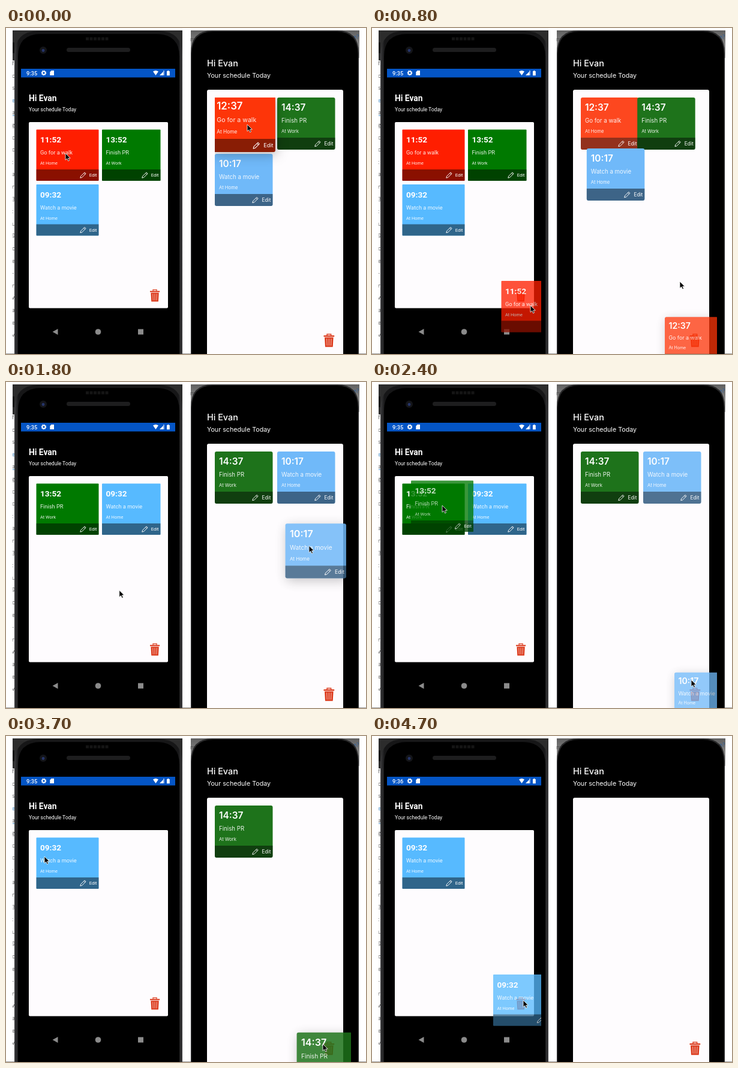
Recreate the animation shown at these times as an HTML page. Size 600 px wide and 544 px high, loop 4800 ms.

```html
<!DOCTYPE html>
<html lang="en">
<head>
<meta charset="utf-8">
<title>Schedule cards on two phones</title>
<style>
  html, body { margin: 0; width: 100%; height: 100%; overflow: hidden; background: #fff; }
  svg { display: block; width: 600px; height: 544px; }
  text { fill: #fff; }
  .droid { font-family: Roboto, Arial, sans-serif; }
  .ios { font-family: Inter, Arial, sans-serif; }
  .edge text { font: 9px "Open Sans", sans-serif; fill: #444; }
  .lift { filter: drop-shadow(2px 4px 9px rgba(0, 0, 0, .27)); }
</style>
</head>
<body>
<svg viewBox="0 0 600 544">
  <defs>
    <clipPath id="droidScreen"><rect x="25" y="67" width="257" height="477"/></clipPath>
    <clipPath id="iosCards"><rect x="348" y="116" width="227" height="428"/></clipPath>
    <clipPath id="edgeClip"><rect x="11" y="20" width="5" height="524"/></clipPath>
    <linearGradient id="rim">
      <stop offset="0" stop-color="#3c3c3e"/><stop offset=".025" stop-color="#161617"/>
      <stop offset=".975" stop-color="#161617"/><stop offset="1" stop-color="#3c3c3e"/>
    </linearGradient>
    <linearGradient id="corner" x2="0" y2="1">
      <stop offset="0" stop-color="#606060"/><stop offset="1" stop-color="#a8a8a8"/>
    </linearGradient>
    <g id="pencil" fill="none" stroke="#fff" stroke-width=".95" stroke-linejoin="round">
      <path d="M.8 10.2 1.6 7.3 8 .9 10.1 3 3.7 9.4ZM6.6 2.3 8.7 4.4"/>
    </g>
    <g id="bin">
      <path d="M5.3 3V.9H11.7V3" fill="none" stroke="#dc3a1c" stroke-width="1.4"/>
      <path d="M0 2.8H17V5H0ZM1.5 6H15.5L14.6 21.5H2.4Z" fill="#dc3a1c"/>
      <path d="M5 8 5.4 19.4M8.5 8V19.4M12 8 11.6 19.4" stroke="#f8d5cd" stroke-width=".9"/>
    </g>
    <path id="arrow" d="M0 0V11.3L2.7 8.9 4.6 13 6.5 12.1 4.7 8.2H8.3Z" fill="#000" stroke="#fff" stroke-width=".8"/>
  </defs>

  <path d="M0 543.5H600" stroke="#9a9a9a"/>

  <!-- left phone -->
  <g class="edge" id="edge" clip-path="url(#edgeClip)"></g>
  <rect x="11" y="4" width="283" height="50" fill="#2c2c2c"/>
  <rect x="11" y="24" width="3" height="18" fill="#111"/>
  <path d="M14 544V46Q14 5 54 5H254Q294 5 294 46V544Z" fill="url(#rim)"/>
  <path d="M20 544V48Q20 10 58 10H250Q289 10 289 48V544Z" fill="#000"/>
  <path d="M133 18H172" stroke="#151515" stroke-width="5" stroke-dasharray="5 1.5"/>
  <rect x="101" y="33" width="106" height="7" rx="3.5" fill="#1d1d1e"/>
  <circle cx="62" cy="37" r="6" fill="#141519"/>
  <circle cx="62" cy="37.5" r="2.4" fill="#26356a"/>
  <rect x="25" y="68" width="257" height="14.5" fill="#0455c5"/>
  <g class="droid">
    <text id="clock" x="34" y="78.5" font-size="9.2" font-weight="500">9:35</text>
    <text x="38" y="122.4" font-size="13.8" font-weight="700">Hi Evan</text>
    <text x="38" y="138.7" font-size="8.6">Your schedule Today</text>
  </g>
  <circle cx="63" cy="75" r="2.6" fill="none" stroke="#fff" stroke-width="1.8"/>
  <circle cx="63" cy="75" r="3.7" fill="none" stroke="#fff" stroke-width="1.2" stroke-dasharray="1.45 1.45"/>
  <path d="M75.5 71H80V79H73.3V73.4Z" fill="#fff"/>
  <path d="M245 72.6Q249.5 69.5 254 72.6L249.5 79ZM264 71V79H256Z" fill="#fff"/>
  <path d="M262 71V79H264V71Z" fill="#8fb4e8"/>
  <path d="M268 72H269.4V71H271.4V72H272.8V79.3H268Z" fill="#fff"/>
  <rect x="38" y="157" width="232" height="310.5" rx="2" fill="#fefcfe"/>
  <use href="#bin" transform="translate(240 436) scale(.95)"/>
  <g fill="#8b8b8b">
    <path d="M77.5 507 86.5 502V512Z"/><circle cx="153.5" cy="507" r="4.8"/>
    <rect x="220" y="502.5" width="9" height="9"/>
  </g>

  <!-- right phone -->
  <rect x="308" y="4" width="281" height="46" fill="url(#corner)"/>
  <g font-family="Open Sans, sans-serif" font-size="9">
    <text x="307" y="22" style="fill:#444">m</text><text x="579" y="18" style="fill:#245a9a">e?</text>
  </g>
  <path d="M308 544V42Q308 4 344 4H552Q588 4 588 42V544Z" fill="#29292a"/>
  <path d="M309.5 544V44Q309.5 6 345 6H551Q586.5 6 586.5 44V544Z" fill="#000"/>
  <g class="ios">
    <text x="335" y="64" font-size="14.4" font-weight="500">Hi Evan</text>
    <text x="335" y="82.5" font-size="10.7">Your schedule Today</text>
  </g>
  <path d="M335 544V106Q335 103 338 103H559Q562 103 562 106V544Z" fill="#fefcfe"/>
  <use href="#bin" transform="translate(529.5 510) scale(1.04)"/>

  <g id="live"></g>
</svg>
<script>
const LOOP = 4800, STEP = 100;
const $ = id => document.getElementById(id);
const lerp = (a, b, u) => a + (b - a) * u;
const clamp = u => Math.max(0, Math.min(1, u));
const ease = u => u < .5 ? 2 * u * u : 1 - 2 * (1 - u) ** 2;

const tasks = {
  red: { label: 'Go for a walk', place: 'At Home' },
  green: { label: 'Finish PR', place: 'At Work' },
  blue: { label: 'Watch a movie', place: 'At Home' }
};
// text rows: [font size, baseline]
const droid = {
  cls: 'droid', h: 85.5, foot: 66.5, pad: 6.5, rx: 1, weight: 700,
  time: [13.6, 21.5], label: [9.25, 41.8], place: [7.4, 58.5], edit: [7.6, 78.8], pen: 31.5, penY: 70.5,
  fill: { red: '#ff1e00', green: '#007900', blue: '#57baff' },
  at: { red: '11:52', green: '13:52', blue: '09:32' }
};
const ios = {
  cls: 'ios', h: 87, foot: 67, pad: 7, rx: 3, weight: 600,
  time: [15.4, 21.5], label: [9.7, 41.5], place: [7.7, 58.7], edit: [8.4, 79.8], pen: 34.5, penY: 71.5,
  fill: { red: '#fd3509', green: '#1e731b', blue: '#70b9f9' },
  at: { red: '12:37', green: '14:37', blue: '10:17' }
};

// scales about the middle of the card
function card(ui, id, x, y, w, opacity = 1, scale = 1, cls = '') {
  const line = ([size, base], str, extra = '') =>
    `<text x="${ui.pad}" y="${base}" font-size="${size}" ${extra}>${str}</text>`;
  const task = tasks[id], grow = (1 - scale) / 2;
  return `<g class="${ui.cls} ${cls}" opacity="${opacity}"
    transform="translate(${x + grow * w} ${y + grow * ui.h}) scale(${scale})">
    <rect width="${w}" height="${ui.h}" rx="${ui.rx}" fill="${ui.fill[id]}"/>
    <path d="M0 ${ui.foot}H${w}V${ui.h - ui.rx}q0 ${ui.rx} ${-ui.rx} ${ui.rx}H${ui.rx}q${-ui.rx} 0 ${-ui.rx} ${-ui.rx}Z" opacity=".46"/>
    ${line(ui.time, ui.at[id], `font-weight="${ui.weight}"`)}
    ${line(ui.label, task.label, 'opacity=".9"')}${line(ui.place, task.place, 'opacity=".92"')}
    <use href="#pencil" x="${w - ui.pen}" y="${ui.penY}"/>
    <text x="${w - 3}" y="${ui.edit[1]}" font-size="${ui.edit[0]}" text-anchor="end">Edit</text></g>`;
}

// cursor paths: [time, x, y]
const leftPath = [
  [0, 99, 209], [200, 101, 212], [700, 255, 452], [800, 264, 463], [1000, 250, 446], [1200, 244, 438],
  [1600, 244, 438], [2100, 106, 212], [2250, 105, 213], [2400, 117, 206], [3000, 240, 436],
  [3200, 246, 445], [3400, 246, 445], [3700, 64, 201], [3900, 101, 213], [4000, 101, 213],
  [4600, 250, 438], [4700, 252, 441]
];
const rightPath = [
  [0, 402, 161], [200, 402, 161], [600, 536, 521], [700, 536, 521], [800, 513, 423], [1200, 492, 165],
  [1400, 489, 152], [1600, 489, 152], [2200, 537, 516], [2300, 537, 516], [2400, 532, 497],
  [2900, 395, 145], [3200, 389, 136], [3300, 389, 136], [3600, 523, 498], [3700, 528, 514],
  [3900, 537, 520], [4100, 540, 524], [4500, 560, 562]
];
function along(path, t) {
  const i = path.findIndex(p => p[0] > t);
  if (i < 0) return path[path.length - 1].slice(1);
  const [a, b] = [path[i - 1], path[i]];
  const u = (t - a[0]) / (b[0] - a[0]);
  return [lerp(a[1], b[1], u), lerp(a[2], b[2], u)];
}
const cursor = ([x, y]) => `<use href="#arrow" x="${x}" y="${y}"/>`;

const leftDrags = [
  { id: 'red', from: 200, to: 1300, dx: 48.5, dy: 41 },
  { id: 'green', from: 2300, to: 3400, dx: 52, dy: 41.5 },
  { id: 'blue', from: 4000, to: LOOP, dx: 50, dy: 43 }
];
const leftSlots = [[50.5, 169.5, 104], [160, 169.5, 97.5], [50.5, 261, 104]];

function leftScene(t) {
  const shown = ['red', 'green', 'blue'].slice((t >= 1500) + (t >= 3500));
  let out = shown.map((id, i) => card(droid, id, ...leftSlots[i])).join('');
  const p = along(leftPath, t);
  const drag = leftDrags.find(d => t >= d.from && t < d.to);
  if (drag) out += card(droid, drag.id, p[0] - drag.dx, p[1] - drag.dy, 104, .77);
  return `<g clip-path="url(#droidScreen)">${out}</g>` + cursor(p);
}

const rightDrags = [
  { id: 'red', slot: [348, 116], press: -300, move: 200, drop: 700, dx: 52, dy: 42.5 },
  { id: 'blue', slot: [452, 116], press: 1500, move: 1600, drop: 2300, dx: 37, dy: 35 },
  { id: 'green', slot: [348, 116], press: 3000, move: 3300, drop: 3900, dx: 41, dy: 17 }
];
const W = 96.5;

function lifted(d, t) {
  if (t < d.press || t >= d.drop + 300) return '';
  if (t <= d.move) {
    const scale = 1 + .09 * clamp((t - d.press) / 200);
    return card(ios, d.id, ...d.slot, W, 1, scale, 'lift');
  }
  const u = clamp((t - d.drop) / 300);
  const [x, y] = along(rightPath, Math.min(t, d.drop));
  return card(ios, d.id, x - d.dx, y - d.dy, W, .85 * (1 - u * u), 1.05 - .4 * u, 'lift');
}

function rightScene(t) {
  const gone = rightDrags.map(d => ease(clamp((t - d.drop) / 460)));
  const move = gone[0];
  const cards = [
    ['red', 348, 116, 1 - gone[0]],
    ['green', lerp(452, 348, move), 116, 1 - gone[2]],
    ['blue', lerp(348, 452, move), lerp(210, 116, move), 1 - gone[1]]
  ];
  // a card resting in its slot is replaced by its lifted copy
  const resting = rightDrags.find(d => t >= d.press && t <= d.move);
  const out = cards.filter(c => c[3] > 0 && c[0] !== resting?.id)
    .map(([id, x, y, o]) => card(ios, id, x, y, W, o)).join('');
  return `<g clip-path="url(#iosCards)">${out}${rightDrags.map(d => lifted(d, t)).join('')}</g>`
    + cursor(along(rightPath, t));
}

// page text showing past the left phone
$('edge').innerHTML = [...'fcseagcd:ar3:u9oe-rwaev'].map((ch, i) =>
  `<text x="10" y="${62 + i * 20.6}" ${i === 3 ? 'style="fill:#2a78b8"' : ''}>${ch}</text>`).join('')
  + '<path d="M11 146H16" stroke="#2a78b8"/>';

let last = -1;
const begin = performance.now();
function draw(now) {
  const t = Math.floor(Math.max(0, now - begin) % LOOP / STEP) * STEP;
  if (t !== last) {
    last = t;
    $('clock').textContent = t < 4200 ? '9:35' : '9:36';
    $('live').innerHTML = leftScene(t) + rightScene(t);
  }
  requestAnimationFrame(draw);
}
draw(begin);
</script>
</body>
</html>
```
